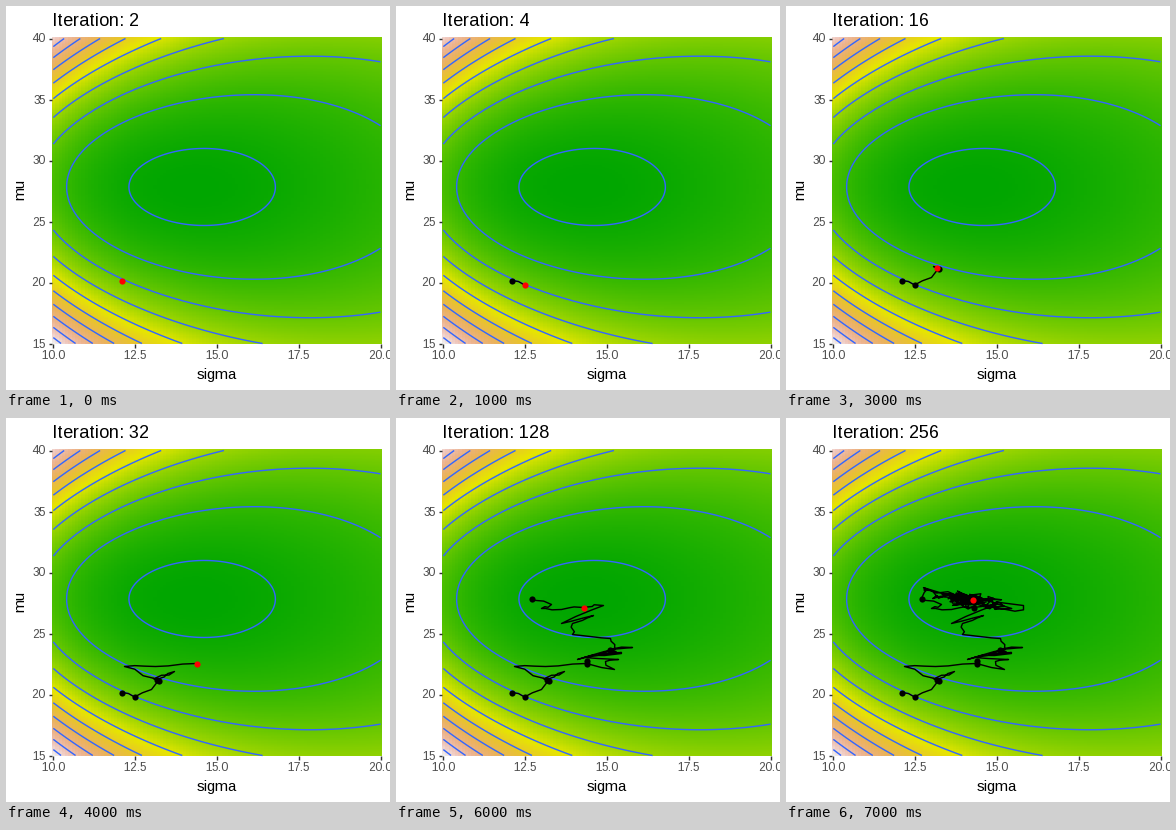
Recreate the animation shown at these times as a matplotlib script. Size 384 by 384 pixels, loop 8 s.

```python
import numpy as np
import matplotlib.pyplot as plt
from matplotlib.animation import FuncAnimation
from matplotlib.colors import LinearSegmentedColormap

SIZE, DPI = 384, 96
PX = 72 / DPI  # points per pixel
LEFT, RIGHT, TOP, BOTTOM = 46, 376, 31, 338  # panel edges
MEAN, VAR = 27.83, 203.4

plt.rcParams["font.family"] = "Liberation Sans"
plt.rcParams["text.hinting_factor"] = 1  # whole-pixel letter spacing


def to_x(sigma):
    return 47.3 + 32.72 * (sigma - 10)


def to_y(mu):
    return 337.5 - 12.2 * (mu - 15)


def loss(sigma, mu):
    """Mean negative log-likelihood of a normal sample."""
    return np.log(sigma) + (VAR + (mu - MEAN) ** 2) / (2 * sigma ** 2)


def wander(start, keys, steps, spread):
    """Go from start through the key points with jittered steps between."""
    path, a = [], np.array(start, float)
    for b in np.array(keys, float):
        for k in range(1, steps + 1):
            jitter = rng.normal(0, (spread, spread / 2))
            path.append(a + (b - a) * k / (steps + 1) + jitter)
        path.append(b)
        a = b
    return path


def roam(start, end, steps):
    """Mean-reverting walk around a slightly tilted band."""
    path, (x, dy) = [], (start[0], -2)
    for _ in range(steps):
        x = np.clip(x + 0.13 * (187 - x) + rng.normal(0, 11), 137, 237)
        dy = 0.7 * dy + rng.normal(0, 3)
        path.append((x, 176 + 0.14 * (x - 150) + dy))
    return path + [end]


rng = np.random.default_rng(5)

# Position at each doubling of the iteration count, in stage pixels
marks = [(115, 274), (128, 278.5), (152, 262), (150, 261),
         (190, 245), (213, 231), (187, 189), (186, 181)]
# Extra dots and the step at which they appear
corner = (135, 180)
extras = [(5, (190, 242)), (6, corner)]

# Trail added at each doubling
legs = [
    marks[:1],
    wander(marks[0], [(122, 275), marks[1]], 0, 0),
    wander(marks[1], [(145, 271), marks[2]], 1, 0.7),
    wander(marks[2], [(147, 260), marks[3]], 0, 0),
    wander(marks[3], [(168, 253), (148, 260), (118, 248), (149, 248), marks[4]], 2, 1.5),
    wander(marks[4], [(218, 251), (209, 243), (222, 241), (188, 239),
                      (225, 234), (202, 236), (236, 229), marks[5]], 1, 2.5),
    wander(marks[5], [(225, 235), (181, 241), (218, 231), (214, 220), (176, 216),
                      (176, 205), (197, 197), (165, 205), (207, 187), marks[6],
                      (165, 191), (145, 190), (155, 186), corner], 2, 2.2),
    roam(corner, marks[7], 128),
]

fig = plt.figure(figsize=(SIZE / DPI, SIZE / DPI), dpi=DPI, facecolor="white")
ax = fig.add_axes([0, 0, 1, 1])
ax.axis("off")

sigma = np.linspace(10, 20, 101)
mu = np.linspace(15, 40, 251)
field = loss(*np.meshgrid(sigma, mu))
terrain = LinearSegmentedColormap.from_list("terrain10", [
    "#00A600", "#2DB600", "#63C600", "#A0D600", "#E6E600",
    "#E8C32E", "#EBB25E", "#EDB48E", "#F0C9C0", "#F2F2F2"], N=1024)
ax.imshow(field, cmap=terrain, origin="lower", aspect="auto",
          interpolation="nearest", extent=(LEFT, RIGHT, BOTTOM, TOP))
ax.contour(to_x(sigma), to_y(mu), field, levels=3.1815 + 0.1 * np.arange(10),
           colors="#3366FF", linewidths=1.42 * PX)
ax.set_xlim(0, SIZE)
ax.set_ylim(SIZE, 0)

tick = dict(color="#333333", lw=1.42 * PX, solid_capstyle="butt")
label = dict(color="#4D4D4D", fontsize=8.8, va="baseline")
for s in (10, 12.5, 15, 17.5, 20):
    x = to_x(s)
    ax.plot([x, x], [BOTTOM, BOTTOM + 3.5], **tick)
    ax.text(x, 353.3, f"{s:.1f}", ha="center", **label)
for m in range(15, 41, 5):
    y = to_y(m)
    ax.plot([LEFT - 3.5, LEFT], [y, y], **tick)
    ax.text(39.3, y + 4, str(m), ha="right", **label)
ax.text(211, 372.5, "sigma", fontsize=11, ha="center", va="baseline")
ax.text(18.5, 183.5, "mu", fontsize=11, rotation=90,
        rotation_mode="anchor", ha="center", va="baseline")
title = ax.text(LEFT, 20, "", fontsize=13.2, va="baseline")

dot = dict(marker="o", ls="", ms=6.2 * PX, mew=0)
trail, = ax.plot([], [], color="black", lw=1.42 * PX, zorder=4,
                 solid_joinstyle="round", solid_capstyle="butt")
past, = ax.plot([], [], color="black", zorder=5, **dot)
current, = ax.plot([], [], color="red", zorder=6, **dot)


def set_points(artist, points):
    xy = np.array(points, float).reshape(-1, 2) + 0.5  # pixel centres
    artist.set_data(xy[:, 0], xy[:, 1])


def draw(i):
    title.set_text(f"Iteration: {2 ** (i + 1)}")
    set_points(trail, [p for leg in legs[:i + 1] for p in leg])
    set_points(past, marks[:i] + [p for start, p in extras if i >= start])
    set_points(current, [marks[i]])
    return title, trail, past, current


anim = FuncAnimation(fig, draw, frames=8, interval=1000, repeat=True)
plt.show()
```
